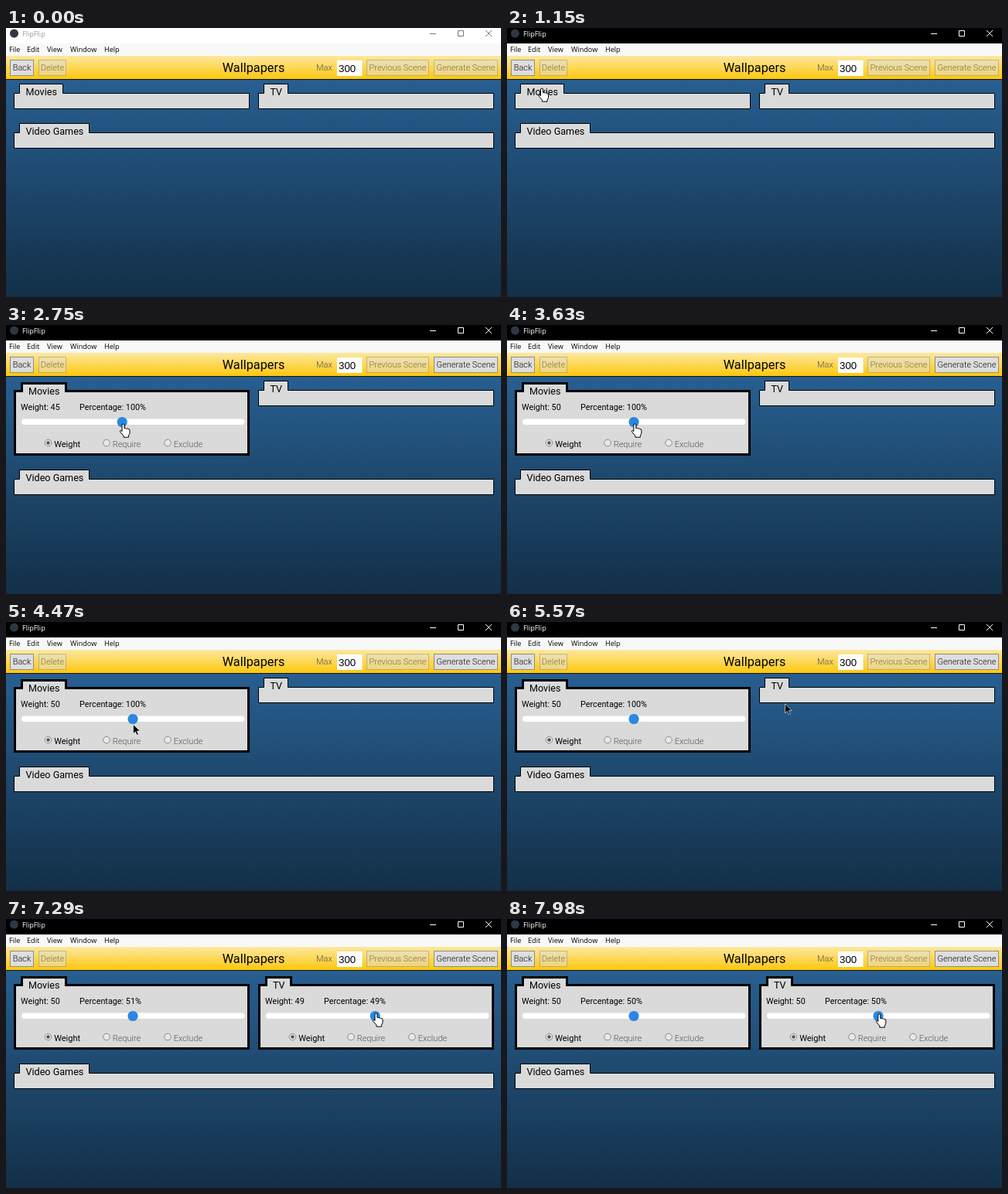
Write an HTML page that moves like this. It is 640 px wide and 348 px high and loops after 8000 ms.

```html
<!DOCTYPE html>
<html lang="en">
<head>
<meta charset="utf-8">
<title>Scene generator</title>
<style>
  html, body { margin: 0; width: 100%; height: 100%; overflow: hidden; background: #142f47; }
  svg { display: block; width: 640px; height: 348px; font: 300 11px Roboto, sans-serif; }
  .sys { font: 400 9.1px "Open Sans", sans-serif; }
  .head { font-size: 12.6px; font-weight: 400; }
  .strong { font-size: 10.8px; font-weight: 400; }
  .dim { fill: #555; }
  .button rect { fill: #dedede; stroke: #8d8d8d; }
  .button text { fill: #111; }
  .off { opacity: .5; }
  #bar { fill: #fff; }
  #bar-text { fill: #999; }
  #controls { fill: none; stroke: #777; }
  .active #bar { fill: #000; }
  .active #bar-text { fill: #fff; }
  .active #controls { stroke: #fff; }
</style>
</head>
<body>
<svg id="stage" viewBox="0 0 640 348">
  <defs>
    <linearGradient id="sea" x2="0" y2="1">
      <stop stop-color="#285f91"/><stop offset="1" stop-color="#132f47"/>
    </linearGradient>
    <linearGradient id="gold" x2="0" y2="1">
      <stop stop-color="#fce8a0"/><stop offset="1" stop-color="#fec70c"/>
    </linearGradient>
  </defs>
  <rect y="66" width="640" height="282" fill="url(#sea)"/>

  <rect id="bar" width="640" height="20"/>
  <circle cx="10.5" cy="7" r="5.5" fill="#2f3744"/>
  <text id="bar-text" class="sys" x="21" y="10.5">FlipFlip</text>
  <path id="controls" d="M548 7.5h8M584.5 3.5h7v7h-7zM620 3l8 8m0-8l-8 8"/>

  <rect y="20" width="640" height="16" fill="#f8f8f8"/>
  <g class="sys">
    <text x="4" y="31">File</text><text x="27" y="31">Edit</text><text x="53" y="31">View</text>
    <text x="83" y="31">Window</text><text x="127" y="31">Help</text>
  </g>

  <rect y="36" width="640" height="30" fill="url(#gold)"/>
  <rect y="66" width="640" height="1" fill="#111"/>
  <text x="320" y="57" text-anchor="middle" font-size="16.3" font-weight="400">Wallpapers</text>
  <text x="401" y="55" class="dim">Max</text>
  <rect x="428" y="42" width="32.5" height="20" fill="#fff"/>
  <text x="430" y="56.5" style="font:400 13.3px 'Liberation Sans',sans-serif">300</text>
  <g id="buttons"></g>

  <g id="panels"></g>
  <path id="arrow" d="M0 0v12l2.8-2.6 2 4.4 2-.9-2-4.3h4z" fill="#000" stroke="#fff" stroke-width=".6"/>
  <path id="hand" d="M-1.5.7q1.5-1.5 3 0v5q1.3-.8 2.6.3 1.3-.6 2.4.6 2-.2 2 1.6v4l-1.5 3v2H.5v-2l-4-4.5q-1.3-2 .6-2.3l1.4 1.3z"
        fill="#fff" stroke="#000"/>
</svg>
<script>
const LOOP = 8000;
const $ = id => document.getElementById(id);

const button = (label, x, w, off) =>
  `<g class="button ${off ? 'off' : ''}"><rect x="${x + .5}" y="41.5" width="${w}" height="20"/>
   <text x="${x + w / 2 + .5}" y="55" text-anchor="middle">${label}</text></g>`;
$('buttons').innerHTML = button('Back', 5, 30) + button('Delete', 42, 35, true) +
  button('Previous Scene', 466, 80, true) + button('Generate Scene', 553, 82, true);
const generate = $('buttons').lastElementChild;

const radio = (label, x, on) =>
  `<circle cx="${x}" cy="152.5" r="4.3" fill="#e8e8e8" stroke="#888"/>
   ${on ? `<circle cx="${x}" cy="152.5" r="2.2" fill="#555"/>` : ''}
   <text x="${x + 7.7}" y="157.5" ${on ? 'font-weight="400"' : 'class="dim"'}>${label}</text>`;

// Outline of a box with its title tab on top, at the given pen width.
function outline(x, y, w, h, tab, pen) {
  const p = pen / 2, lift = pen > 1 ? 10 : 12, left = x + (pen > 1 ? 9 : 7);
  return `M${x + p} ${y + p}H${left + p}v${-lift}H${left + tab - p}v${lift}H${x + w - p}V${y + h - p}H${x + p}z`;
}

function makePanel(title, x, y, w, tab) {
  const g = document.createElementNS('http://www.w3.org/2000/svg', 'g');
  g.innerHTML = `<path fill="#dadada" stroke="#000"/><text class="head">${title}</text>
    <g transform="translate(${x - 10})">
      <text class="strong" x="19" y="109.5"></text><text class="strong" x="95" y="109.5"></text>
      <rect x="20" y="121.5" width="288.5" height="7.5" rx="3.75" fill="#fff"/>
      <circle cy="125.5" r="6.6" fill="#2b87e0"/>
      ${radio('Weight', 54.5, true)}${radio('Require', 130, false)}${radio('Exclude', 209, false)}
    </g>`;
  $('panels').append(g);
  const [path, head, body] = g.children;
  const [weightText, shareText, , thumb] = body.children;
  return {
    x, w,
    draw(open, weight, total, drop = 0) {
      const pen = open ? 3 : 1;
      path.setAttribute('d', outline(x, y + drop, w, open ? 85 : 21, tab + (open ? 3 : 0), pen));
      path.setAttribute('stroke-width', pen);
      head.setAttribute('x', x + (open ? 19 : 15.5));
      head.setAttribute('y', y + drop + (open ? 6 : 3));
      body.style.display = open ? '' : 'none';
      weightText.textContent = `Weight: ${weight}`;
      shareText.textContent = `Percentage: ${total ? Math.round(100 * weight / total) : 0}%`;
      thumb.setAttribute('cx', 26 + 2.76 * weight);
    }
  };
}

const movies = makePanel('Movies', 10, 84, 305, 57);
const tv = makePanel('TV', 326, 84, 305, 32);
const games = makePanel('Video Games', 10, 135, 621, 91);

// Keys are [time, value, ...]; values ease from one key to the next.
function follow(keys, t) {
  if (t <= keys[0][0]) return keys[0].slice(1);
  const i = keys.findIndex(k => k[0] > t);
  if (i < 0) return keys[keys.length - 1].slice(1);
  const a = keys[i - 1], b = keys[i];
  const u = (t - a[0]) / (b[0] - a[0]), e = u * u * (3 - 2 * u);
  return a.slice(1).map((v, n) => v + (b[n + 1] - v) * e);
}

const ACTIVE = 420, OPEN_MOVIES = 1340, OPEN_TV = 5860;
const moviesKeys = [[1850, 0], [2750, 45], [3300, 50]];
const tvKeys = [[6250, 0], [7290, 49], [7600, 50]];
const pointerKeys = [
  [420, 190, 352], [1080, 45, 78], [1400, 45, 78], [1780, 27.3, 128],
  [1850, 27.3, 128], [2750, 151.5, 128], [3300, 165.3, 128], [3700, 165.3, 128],
  [4000, 164.5, 132.5], [4750, 164.5, 132.5], [5450, 359.5, 106], [5570, 359.5, 106],
  [5760, 349, 82], [5900, 349, 82], [6180, 343.3, 122],
  [6250, 343.3, 122], [7290, 478.5, 122], [7600, 481.3, 123]
];

function overTarget(panel, open, weight, x, y) {
  if (open) return Math.hypot(x - panel.x - 16 - 2.76 * weight, y - 125.5) < 6.8;
  return x > panel.x && x < panel.x + panel.w && y > 72 && y < 105;
}

function draw(t) {
  const movieOpen = t >= OPEN_MOVIES, tvOpen = t >= OPEN_TV;
  const a = Math.round(follow(moviesKeys, t)[0]);
  const b = Math.round(follow(tvKeys, t)[0]);
  movies.draw(movieOpen, a, a + b);
  tv.draw(tvOpen, b, a + b);
  games.draw(false, 0, 0, movieOpen ? 64 : 0);
  generate.classList.toggle('off', a + b === 0);
  $('stage').classList.toggle('active', t >= ACTIVE);

  const [x, y] = follow(pointerKeys, t);
  const over = overTarget(movies, movieOpen, a, x, y) || overTarget(tv, tvOpen, b, x, y);
  for (const id of ['arrow', 'hand']) {
    $(id).setAttribute('transform', `translate(${x} ${y})`);
    $(id).style.display = t >= ACTIVE && (id === 'hand') === over ? '' : 'none';
  }
}

const start = performance.now();
function tick() {
  draw((performance.now() - start) % LOOP);
  requestAnimationFrame(tick);
}
tick();
</script>
</body>
</html>
```
